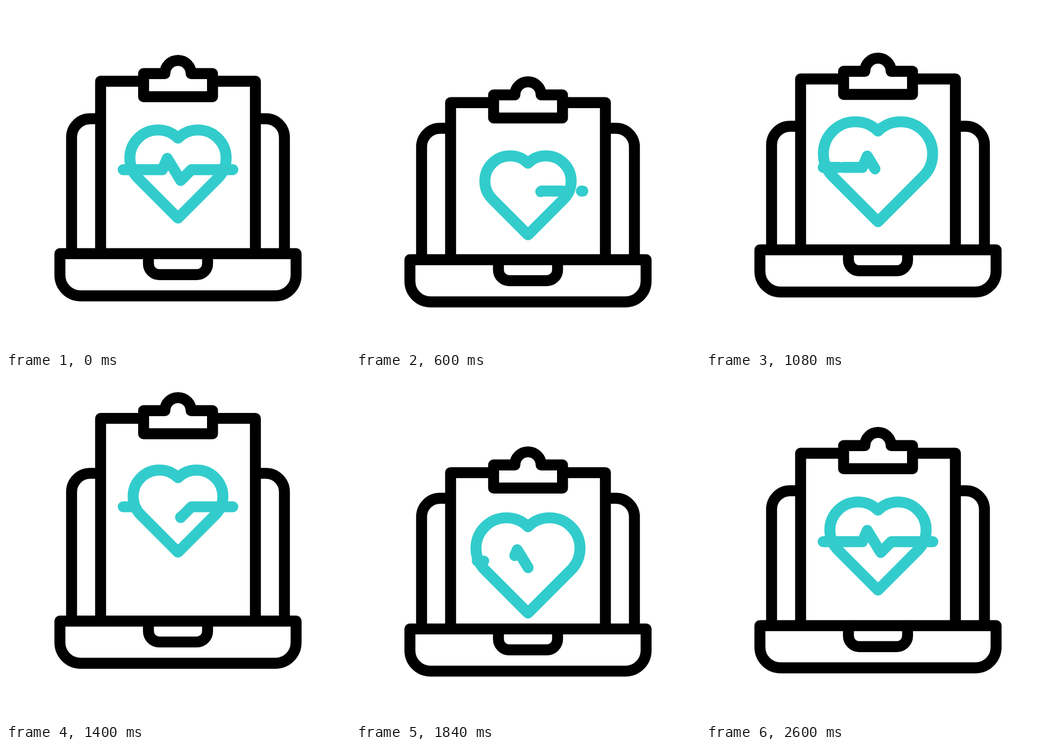
Animation, 640 px wide and 640 px high, one loop 3 s. Source, as an HTML page with a canvas:

```html
<!DOCTYPE html>
<html lang="en">
<head>
<meta charset="utf-8">
<title>Health report on a laptop</title>
<style>
  html, body { margin: 0; width: 100%; height: 100%; overflow: hidden; background: #fff; }
  canvas { display: block; width: 640px; height: 640px; }
</style>
</head>
<body>
<canvas id="stage" width="640" height="640"></canvas>
<script>
const ctx = document.getElementById('stage').getContext('2d');
const LOOP = 3000, STEP = 40;
const INK = '#000', TEAL = '#33cccc';

const smooth = x => x <= 0 ? 0 : x >= 1 ? 1 : x * x * (3 - 2 * x);

// Eased value at t from [time, value] pairs.
function track(t, keys) {
  if (t <= keys[0][0]) return keys[0][1];
  for (let i = 1; i < keys.length; i++) {
    const [t0, a] = keys[i - 1], [t1, b] = keys[i];
    if (t < t1) return a + (b - a) * smooth((t - t0) / (t1 - t0));
  }
  return keys[keys.length - 1][1];
}

const bounce = (start, values) => values.map((v, i) => [start + i * 520, v]);
const baseKeys = bounce(200, [0, 13, -13, 6.5, 0]);
const boardKeys = bounce(320, [0, 51, -57.8, 31.5, 0]);
const screenKeys = bounce(440, [0, 28.7, -27.4, 18.2, 0]);
const beatKeys = [[200, 1], [580, .895], [1065, 1.135], [1440, .925], [1840, 1.08], [2220, .97], [2600, 1]];

// Sweeps along the pulse: start times, alternately erasing and drawing.
const sweeps = [225, 298, 350, 608, 680, 881, 983, 995, 1180, 1331, 1400, 1629, 1684, 1771, 1798, 1960];
const SWEEP = 400;
const pulsePoints = [[218, 304.5], [291, 304.5], [300, 283.5], [325, 324.5], [345, 304.5], [422, 304.5]];
const pulseLength = pulsePoints.reduce((sum, [x, y], i, p) =>
  i ? sum + Math.hypot(x - p[i - 1][0], y - p[i - 1][1]) : 0, 0);

const pulse = new Path2D('M' + pulsePoints.join('L'));
const base = new Path2D('M100.3 460.8H539.7V500.8A38.5 38.5 0 0 1 501.2 539.3H138.8A38.5 38.5 0 0 1 100.3 500.8Z');
const notch = new Path2D('M265 461V479.7A20 20 0 0 0 285 499.7H355A20 20 0 0 0 375 479.7V461');
const clip = new Path2D('M256 125.7H295.6A24.4 24.4 0 0 1 344.4 125.7H384.2V168.7H256Z');
const screen = new Path2D('M122 620V244.3A34.5 34.5 0 0 1 156.5 209.8H176M464 209.8H483.5A34.5 34.5 0 0 1 518 244.3V620');
const paper = new Path2D('M176 620V140H256M384 140H464V620');

function heartPath(scale) {
  const p = new Path2D(), r = 52.5 * scale, q = Math.PI / 4;
  const x = dx => 320 + dx * scale, y = v => 312.5 + (v - 312.5) * scale;
  p.arc(x(-37.1), y(283.1), r, 3 * q, 7 * q);
  p.arc(x(37.1), y(283.1), r, 5 * q, 9 * q);
  p.lineTo(320, y(394.6));
  p.closePath();
  return p;
}

function stroke(path, color) {
  ctx.strokeStyle = color;
  ctx.stroke(path);
}

function shifted(dy, draw) {
  ctx.save();
  ctx.translate(0, dy);
  draw();
  ctx.restore();
}

function drawPulse(t) {
  const pos = start => pulseLength * smooth((t - start) / SWEEP);
  for (let i = 0; i <= sweeps.length; i += 2) {
    const head = i ? pos(sweeps[i - 1]) : pulseLength;
    const tail = i < sweeps.length ? pos(sweeps[i]) : 0;
    if (head - tail < .05) continue;
    ctx.setLineDash([head - tail, 2 * pulseLength]);
    ctx.lineDashOffset = -tail;
    stroke(pulse, TEAL);
  }
  ctx.setLineDash([]);
}

function render(t) {
  const baseY = track(t, baseKeys);
  const boardY = baseY + track(t, boardKeys);
  const screenY = baseY + track(t, screenKeys);

  ctx.fillStyle = '#fff';
  ctx.fillRect(0, 0, 640, 640);
  ctx.lineWidth = 20.4;
  ctx.lineJoin = ctx.lineCap = 'round';

  // Everything behind the keyboard edge
  ctx.save();
  ctx.beginPath();
  ctx.rect(0, 0, 640, 461 + baseY);
  ctx.clip();
  shifted(screenY, () => stroke(screen, INK));
  shifted(boardY, () => {
    ctx.fillRect(176, 140, 288, 480);
    stroke(paper, INK);
    stroke(clip, INK);
    stroke(heartPath(track(t, beatKeys)), TEAL);
    drawPulse(t);
  });
  ctx.restore();

  shifted(baseY, () => {
    stroke(base, INK);
    stroke(notch, INK);
  });
}

const begin = performance.now();
function tick() {
  const t = (performance.now() - begin) % LOOP;
  render(Math.floor(t / STEP) * STEP);
  requestAnimationFrame(tick);
}
tick();
</script>
</body>
</html>
```
